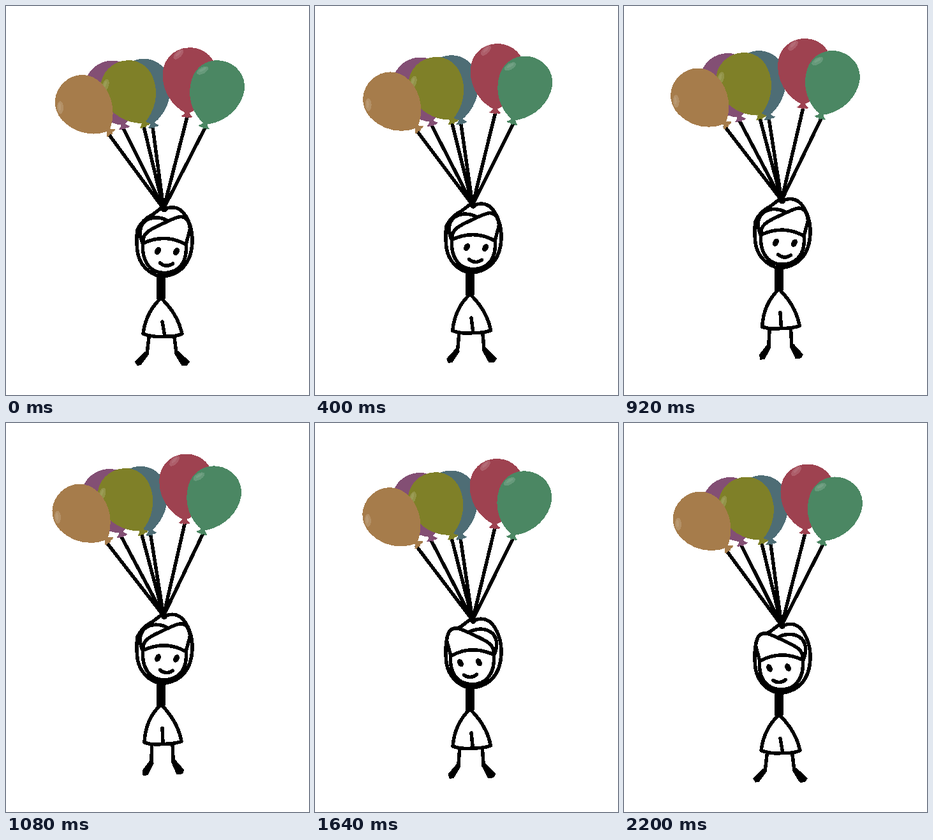
An HTML page for the animation above (2.24 s loop, 475 px wide and 610 px high).

```html
<!DOCTYPE html>
<html lang="en">
<head>
<meta charset="utf-8">
<title>Balloon ride</title>
<style>
  html, body { margin: 0; width: 100%; height: 100%; overflow: hidden; background: #fff; }
  svg { display: block; width: 475px; height: 610px; shape-rendering: crispEdges; }
  .ink { fill: none; stroke: #000; stroke-width: 5.5; stroke-linecap: round; stroke-linejoin: round; }
  .white { fill: #fff; }
</style>
</head>
<body>
<svg viewBox="0 0 475 610">
  <defs>
    <g id="balloon">
      <path d="M0 1C-24 -8 -42.5 -32 -42.5 -61C-42.5 -86 -23 -103 0 -103C23 -103 42 -86 42 -61C42 -32 22 -8 0 1Z"/>
      <path d="M-3 -2Q-4 2 -9 5Q-6 8 -3 6L0 8L3 6Q6 8 9 5Q4 2 3 -2Z"/>
    </g>
    <g id="shine" fill="#fff">
      <ellipse rx="10" ry="5" opacity=".15"/>
      <ellipse cx="1" cy="-1" rx="6" ry="2" opacity=".08"/>
    </g>
  </defs>
  <g id="bunch">
    <g id="strings" class="ink"></g>
    <g id="balloons"></g>
  </g>
  <g id="figure">
    <path class="ink" d="M243 424C224 421 209 405 206 385Q204 366 206 351C211 340 220 332 230 327L243 317"/>
    <path class="ink" d="M245 424C274 422 291 402 292 370C293 346 282 322 268 317Q258 314 248 319"/>
    <circle cx="248" cy="318" r="5.500"/>
    <g id="head">
      <path class="ink white" d="M215 370C212 395 222 418 248 418.500C274 418 285 398 282 372"/>
      <path class="ink white" d="M214 372C206 352 211 335 232 332Q244 331 254 337L240 362Z"/>
      <path class="ink white" d="M215 372C213 357 225 351 240 344C255 337 266 331 273 330.500C281 330 285 334 287 342Q289 347 288 352L282 374Q250 356 215 372Z"/>
      <ellipse cx="238" cy="384" rx="4.500" ry="6.500" transform="rotate(26 238 384)"/>
      <ellipse cx="267" cy="385" rx="4.500" ry="6.500" transform="rotate(26 267 385)"/>
      <path class="ink" d="M241.500 403Q251 411 261.500 404"/>
    </g>
    <path d="M236 420H250L249.500 460H236.500Z"/>
    <path id="legs" class="ink"/>
    <path id="feet" stroke="#000" stroke-width="2" stroke-linejoin="round"/>
    <path id="shorts" class="ink white"/>
  </g>
</svg>
<script>
  const FRAME = 40, FRAMES = 56, RISE = 16.2, TILT = -1.55;
  const KNOT = [247, 318];
  const $ = id => document.getElementById(id);

  // Back to front: knob position, lean in degrees, colour, shine position
  const balloons = [
    { x: 184, y: 186, lean: -17, color: '#834f74' },
    { x: 230, y: 184, lean: -14, color: '#4e6d75' },
    { x: 216, y: 183, lean: -24, color: '#7f8028' },
    { x: 161, y: 195, lean: -43, color: '#a67c4b' },
    { x: 284, y: 168, lean: 4, color: '#9e4250', shine: '-20 -91' },
    { x: 312, y: 185, lean: 19, color: '#4b8763' }
  ];

  $('strings').innerHTML = balloons.map(({ x, y }) =>
    `<path d="M${KNOT}L${x} ${y + 6}"/>`).join('');
  $('balloons').innerHTML = balloons.map(({ x, y, lean, color, shine = '-31 -78' }) =>
    `<g transform="translate(${x} ${y}) rotate(${lean})">
      <use href="#balloon" fill="${color}"/>
      <use href="#shine" transform="translate(${shine}) rotate(-48)"/>
    </g>`).join('');

  // Paths at the bottom and at the top of the ride
  const poses = {
    shorts: [
      'M243 458C228 472 218 490 215 514Q230 520 249 518L245 495L249 518Q266 519 276 514C271 491 259 473 243 458Z',
      'M243 457C228 471 218 490 217 517Q230 521 246 519L245 494L246 519Q263 519 275 515C271 492 258 472 243 457Z'
    ],
    legs: [
      'M224 520L221 545M264 520L267 544',
      'M229 520L228 548M261 520L262 548'
    ],
    feet: [
      'M218 543L223 546L211 562L206 563L203 558ZM265 545L270 542L287 558L283 563L276 563Z',
      'M226 546L231 549L222 567L216 568L215 561ZM260 548L265 545L278 560L276 565L268 566Z'
    ]
  };

  function mix([from, to], k) {
    const ends = to.match(/\d+/g);
    let i = 0;
    return from.replace(/\d+/g, n => (+n + (ends[i++] - n) * k).toFixed(2));
  }

  function draw(time) {
    const frame = Math.floor(time / FRAME) % FRAMES;
    const half = FRAMES / 2;
    const height = 1 - Math.abs(frame / half - 1);
    const lift = -RISE * height;
    $('bunch').setAttribute('transform', `translate(0 ${lift}) rotate(${TILT * height} ${KNOT})`);
    $('figure').setAttribute('transform', `translate(0 ${lift})`);
    $('head').setAttribute('transform', frame < half ? '' : 'translate(495 0) scale(-1 1)');
    for (const id in poses) $(id).setAttribute('d', mix(poses[id], height));
  }

  const start = performance.now();
  function tick() {
    draw(performance.now() - start);
    requestAnimationFrame(tick);
  }
  tick();
</script>
</body>
</html>
```
